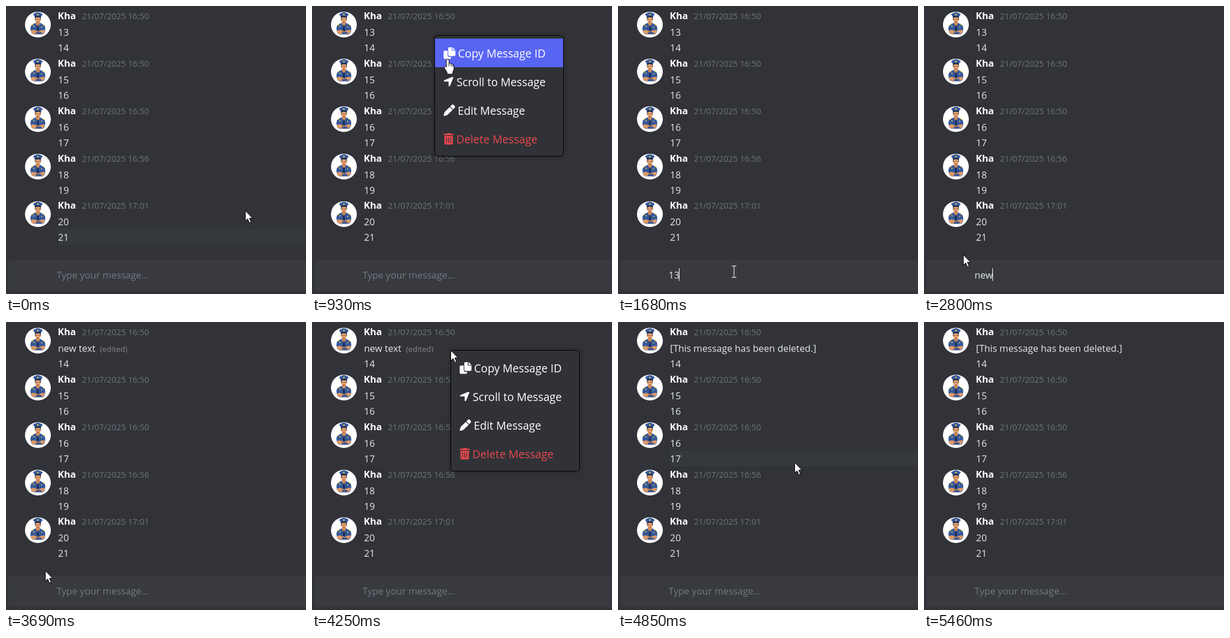
Write an HTML page that moves like this. It is 522 px wide and 503 px high and loops after 5600 ms.

```html
<!DOCTYPE html>
<html lang="en">
<head>
<meta charset="utf-8">
<title>Chat message menu</title>
<style>
  html, body { margin: 0; width: 100%; height: 100%; overflow: hidden; background: #313338; }
  svg { display: block; width: 100%; height: 100%; }
  text { font: 16.45px "Open Sans", "Noto Sans", sans-serif; fill: #e6e8ea; white-space: pre; }
  .name { font-weight: 700; font-size: 16.5px; fill: #fff; }
  .date { font-size: 14.4px; fill: #70737b; }
  .edited { font-size: 13.5px; fill: #85878c; }
  .hint { fill: #75787f; }
  .item text { font-size: 19.2px; font-weight: 500; fill: inherit; }
  .item { fill: #fff; }
  .item.danger { fill: #e5484d; }
  .item.danger.on { fill: #fff; }
  .back { fill: none; }
  .on .back { fill: #5865f2; }
  .danger.on .back { fill: #e5484d; }
  .frame { fill: #303237; stroke: #000; filter: drop-shadow(0 0 4px rgba(0, 0, 0, .25)); }
</style>
</head>
<body>
<svg viewBox="0 0 522 503">
  <defs>
    <g id="avatar">
      <circle r="22.5" fill="#fff"/>
      <path d="M-4-3L-10 0Q-13 2-13 8L-11 15-7 17H9L12 13Q14 5 11 1L4-3Z" fill="#35589c"/>
      <path d="M-3.500-5V-1L0 3 3.500-1V-5Z" fill="#c98555"/>
      <path d="M-1 2H1L1.800 9 0 11-1.800 9Z" fill="#1e2a4a"/>
      <path d="M-4.800-13H4.800V-8Q4-3 0-2-4-3-4.800-8Z" fill="#e2a273"/>
      <path d="M-5-13H-4V-8H-5ZM4-13H5V-8H4Z" fill="#3a2620"/>
      <path d="M-2.500-9H-1M1-9H2.500M-1.500-4.500H1.500" stroke="#5b3424" fill="none"/>
      <path d="M-8.500-18Q-5-20.500 0-22 5-20.500 8.500-18L5.500-14H-5.500Z" fill="#35589c"/>
      <path d="M-5.500-14.800H5.500L5-12Q0-13.500-5-12Z" fill="#1c2947"/>
      <circle cy="-17.500" r="1.400" fill="#f0c63c"/>
      <path d="M-13 11Q-9 8-4 10L7 14 5 17-10 16ZM13 10Q8 8 3 11L-4 14-3 17 9 16Z" fill="#dc9a68"/>
      <path d="M-4 11L3 14M3 11L-3 14" stroke="#a9683f" fill="none"/>
      <path d="M-8 3H-5.500M5.500 4H7.500M-11 1L-8.500-.5M8.500-.5L11 1" stroke="#f0d03c" stroke-width="1.500"/>
    </g>
    <path id="arrow" d="M.5.5V18.500L4.600 14.800 7.600 21.800 10.400 20.600 7.500 13.700H13Z" fill="#fff" stroke="#000"/>
    <g id="hand" fill="#fff" stroke="#000" stroke-linejoin="round">
      <path d="M-2.200 2.500Q0-1.500 2.400 2.500V8Q4.500 6.800 6 9 8.200 8 9 10.500 11 10 11 13V19L9 23V27H-1V24L-5-0 17 -5.300 17Q-6.500 12.500-3.500 13.500L-2.200 15Z" display="none"/>
      <path d="M-2.200 2.500Q0-1.500 2.400 2.500V8Q4.500 6.800 6 9 8.200 8 9 10.500 11 10 11 13V19L9 23V27H-1V24L-5.300 17Q-6.500 12.500-3.500 13.500L-2.200 15Z"/>
      <path d="M2.400 8V13M6 9V13.500M9 10.500V14" fill="none"/>
    </g>
    <path id="beam" d="M-4-10H-1L0-9 1-10H4M0-9V9M-4 10H-1L0 9 1 10H4" fill="none" stroke="#d4d5d7" stroke-width="1.300"/>
    <g id="copy">
      <path d="M2 6H7V14Q7 17 10 17H13V18Q13 20.500 11 20.500H2Q0 20.500 0 18.500V8Q0 6 2 6Z"/>
      <path d="M10 0H14V5Q14 6 15 6H20.500V13.500Q20.500 15.500 18.500 15.500H10Q8 15.500 8 13.500V2Q8 0 10 0ZM15.200 0L20.500 5H15.200Z"/>
    </g>
    <path id="go" d="M16.800 3.600Q17 1.500 14.800 2L1.400 7.500Q-.5 9.500 1.300 10H8.700V17Q9.500 19.500 11.200 17.300Z"/>
    <path id="pencil" d="M14.200.8Q16-.6 17.600.8L19.200 2.400Q20.600 4 19.200 5.800L16.500 8.500 11.500 3.500ZM10.600 4.400L15.600 9.400 7.400 17.600Q6.500 18.400 5.500 18.700L1.200 20Q-.2 20 0 18.800L1.400 14.200Q1.700 13.300 2.400 12.600Z"/>
    <path id="trash" fill-rule="evenodd" d="M6 0H11.500L12.500 1.300H16.500Q17.500 1.300 17.500 2.500T16.500 3.800H1Q0 3.800 0 2.500T1 1.300H5ZM1.300 5H16.200V18Q16 20 14 20H3.500Q1.500 20 1.300 18ZM4.400 8V17H5.600V8ZM8.150 8V17H9.350V8ZM11.900 8V17H13.100V8Z"/>
  </defs>
  <rect width="522" height="503" fill="#313338"/>
  <rect id="hover" x="91" width="440" height="27" rx="3" fill="#35393d"/>
  <g id="chat"></g>
  <rect x="4" y="443" width="540" height="55" rx="5" fill="#383a40"/>
  <rect id="mark" x="88" y="458" height="24" fill="#0078d7"/>
  <text id="field" x="88" y="476"></text>
  <rect id="caret" y="458" width="1" height="22" fill="#fff"/>
  <g id="menu"><rect class="frame" x=".5" y=".5" width="224" height="211" rx="5"/></g>
  <use id="cursor"/>
</svg>
<script>
const LOOP = 5600;
const $ = id => document.getElementById(id);
const show = (el, on) => el.setAttribute('display', on ? 'inline' : 'none');
const rowTop = i => Math.round(82.8 * (i >> 1) + .2) + 32 + 27 * (i % 2);

function add(parent, tag, attrs, text = '') {
  const el = document.createElementNS('http://www.w3.org/2000/svg', tag);
  for (const k in attrs) el.setAttribute(k, attrs[k]);
  el.textContent = text;
  return parent.appendChild(el);
}

const posts = [
  ['16:50', 13, 14], ['16:50', 15, 16], ['16:50', 16, 17], ['16:56', 18, 19], ['17:01', 20, 21]
];
const lines = [];
posts.forEach(([time, ...texts], i) => {
  const y = rowTop(2 * i) - 9, chat = $('chat');
  add(chat, 'use', { href: '#avatar', x: 55.5, y: 32.5 + Math.floor(82.75 * i) });
  add(chat, 'text', { class: 'name', x: 90, y }, 'Kha');
  add(chat, 'text', { class: 'date', x: 132, y }, '21/07/2025 ' + time);
  texts.forEach((s, j) => lines.push(add(chat, 'text', { x: 90.5, y: y + 29 + 27 * j }, s)));
});
const edited = add($('chat'), 'text', { class: 'edited', x: 163.5, y: 52 }, '(edited)');

const items = [
  ['copy', 'Copy Message ID', 41], ['go', 'Scroll to Message', 38.5],
  ['pencil', 'Edit Message', 40.5], ['trash', 'Delete Message', 38]
].map(([icon, label, x], i) => {
  const g = add($('menu'), 'g', { class: 'item', transform: `translate(0 ${6 + 50 * i})` });
  if (icon === 'trash') g.classList.add('danger');
  add(g, 'rect', { class: 'back', x: 1, width: 223, height: 50 });
  add(g, 'use', { href: '#' + icon, x: 16, y: 15 });
  add(g, 'text', { x, y: 33 }, label);
  return g;
});

// start, end, steps, goal x, goal y
const moves = [
  [50, 560, 12, 213, 51],
  [890, 930, 2, 236, 92],
  [980, 1260, 7, 250, 178],
  [1400, 1680, 7, 202, 463.5],
  [1870, 1870, 1, 201, 463.5],
  [2100, 2290, 4, 57, 443],
  [2430, 2570, 4, 68, 434],
  [3730, 4060, 8, 241, 49],
  [4290, 4480, 5, 311, 201],
  [4530, 4620, 3, 316, 232],
  [4850, 5410, 13, 121, 509]
];
// start, end, x, y
const menus = [[700, 1400, 213, 51], [4200, 4850, 241, 49]];
const typing = [
  [0, ''], [1400, '13'], [2570, 'n'], [2710, 'ne'], [2800, 'new'], [2890, 'new '],
  [2980, 'new t'], [3060, 'new te'], [3130, 'new tex'], [3310, 'new text'], [3450, '']
];
const message = [[0, '13'], [3500, 'new text'], [4850, '[This message has been deleted.]']];

const at = (table, t) => table.filter(r => r[0] <= t).pop()[1];
const ease = p => p + .5 * p * (1 - p) * (2 * p - 1);

function pointer(t) {
  let x = 416, y = 357;
  for (const [t0, t1, n, tx, ty] of moves) {
    if (t < t0) break;
    const k = n > 1 ? Math.floor((t - t0) / (t1 - t0) * (n - 1) + 1e-6) + 1 : 1;
    const p = ease(Math.min(1, k / n));
    x += (tx - x) * p;
    y += (ty - y) * p;
  }
  return [x, y];
}

function draw(t) {
  const [x, y] = pointer(t);
  const menu = menus.find(m => t >= m[0] && t < m[1]);
  let row = -1;
  show($('menu'), menu);
  if (menu) {
    $('menu').setAttribute('transform', `translate(${menu[2]} ${menu[3]})`);
    if (x > menu[2]) row = Math.floor((y - menu[3] - 6) / 50);
    items.forEach((el, i) => el.classList.toggle('on', i === row));
  }

  let over = lines.findIndex((_, i) => y >= rowTop(i) && y < rowTop(i) + 27);
  if (t < 50) over = 9;
  show($('hover'), !menu && over >= 0 && x > 91);
  if (over >= 0) $('hover').setAttribute('y', rowTop(over));

  lines[0].textContent = at(message, t);
  show(edited, t >= 3500 && t < 4850);

  const value = at(typing, t), field = $('field');
  field.textContent = value || 'Type your message...';
  field.setAttribute('class', value ? '' : 'hint');
  const width = value ? field.getComputedTextLength() : 0;
  const from = Math.max(88, x);
  const selected = t >= 2100 && t < 2570 && from < 88 + width;
  show($('mark'), selected);
  if (selected) {
    $('mark').setAttribute('x', from);
    $('mark').setAttribute('width', 88 + width - from);
  }
  const blink = t >= 3450 && t < 3690 || t >= 4060 && t < 4200;
  show($('caret'), value ? !selected : blink);
  $('caret').setAttribute('x', Math.round(87.5 + width));

  const shape = row >= 0 ? 'hand' : y > 443 && x > 80 ? 'beam' : 'arrow';
  const cursor = $('cursor');
  cursor.setAttribute('href', '#' + shape);
  cursor.setAttribute('transform', `translate(${Math.round(x)} ${Math.round(y)})`);
  show(cursor, t < 5460);
}

const start = performance.now();
function tick() {
  draw((performance.now() - start) % LOOP);
  requestAnimationFrame(tick);
}
tick();
</script>
</body>
</html>
```
